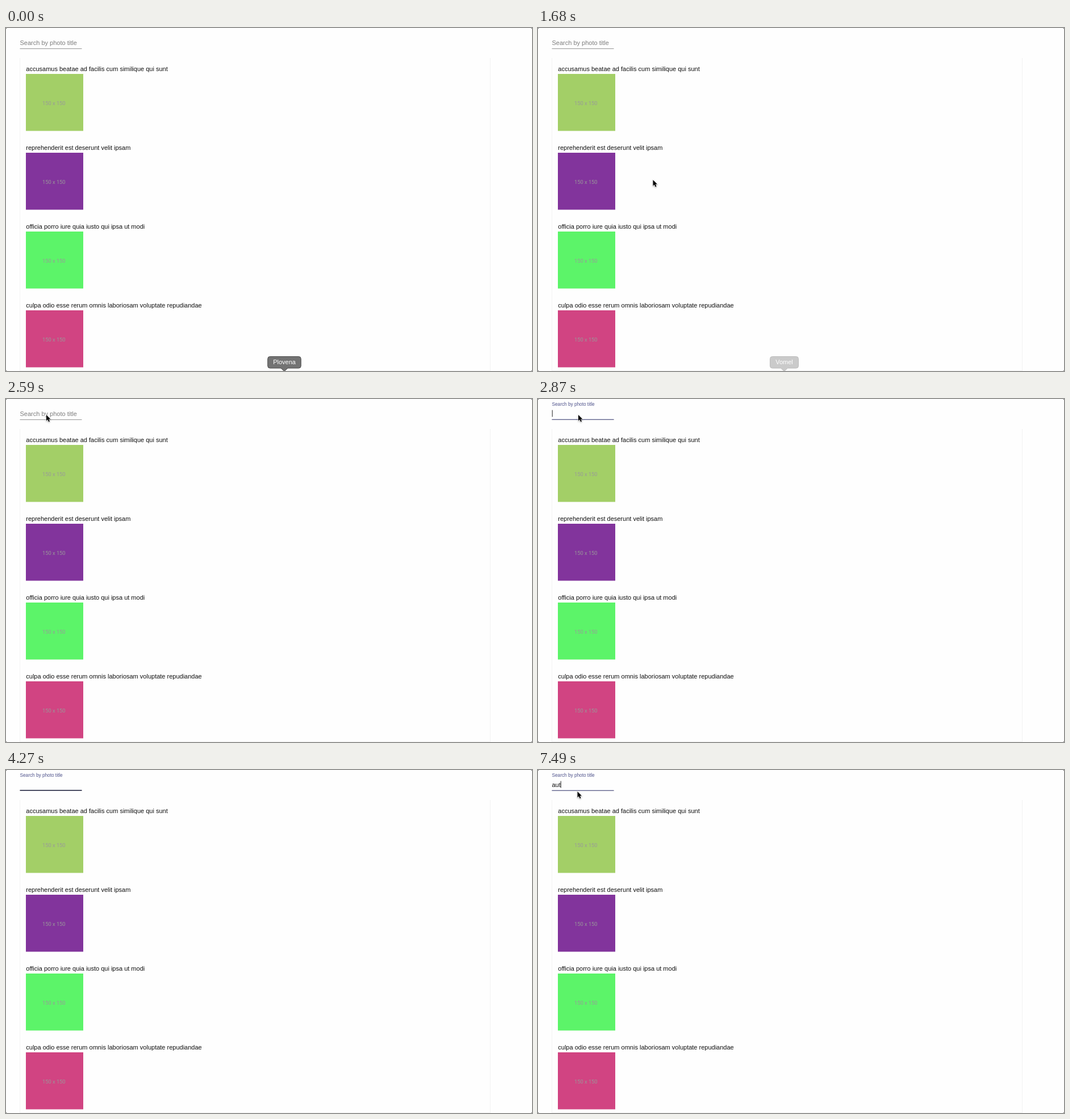
Write an HTML page that moves like this. It is 926x605 px and loops after 8 s.

```html
<!DOCTYPE html>
<html lang="en">
<head>
<meta charset="utf-8">
<title>Photo search</title>
<style>
  html, body { margin: 0; width: 100%; height: 100%; overflow: hidden; background: #555; }
  svg { display: block; width: 926px; height: 605px; }
  text { font-family: "Liberation Sans", Arial, sans-serif; font-size: 11px; fill: #111; }
  .size { font-family: Roboto, sans-serif; font-size: 9.3px; fill: #999; text-anchor: middle; }
  .tip text { fill: #fff; text-anchor: middle; }
  .tip path { fill: #737373; stroke: #4c4c4c; }
</style>
</head>
<body>
<svg viewBox="0 0 926 605">
  <rect width="926" height="605" rx="2.5" fill="#fefefe"/>
  <path d="M24.5 53V605M852.5 53V605M25 604.5H852" stroke="#f3f3f3" fill="none"/>
  <g id="photos"></g>
  <text id="label" x="24.5"></text>
  <rect y="36" x="24.5" width="109" height="1" fill="#949494"/>
  <rect id="focusLine" y="36"/>
  <text id="typed" x="24.5" y="29.5"></text>
  <rect id="caret" y="19.5" width="1" height="12" fill="#222"/>
  <g id="tips"></g>
  <path id="cursor" d="M0 0V10.4L2.4 8.2L4.1 12.2L6 11.4L4.3 7.5H7.5Z"
        stroke="#fff" stroke-width="1.2" paint-order="stroke" style="filter:drop-shadow(0 1px 1px #0005)"/>
</svg>
<script>
const LOOP = 8000, STEP = 70;
const $ = id => document.getElementById(id);
const set = (el, attrs) => { for (const k in attrs) el.setAttribute(k, attrs[k]); };
const progress = (t, from, to) => Math.min(1, Math.max(0, (t - from) / (to - from)));
const lerp = (a, b, p) => a + (b - a) * p;
const mix = (a, b, p) => `rgb(${a.map((v, i) => Math.round(lerp(v, b[i], p)))})`;

const photos = [
  ["accusamus beatae ad facilis cum similique qui sunt", "#a3cf67"],
  ["reprehenderit est deserunt velit ipsam", "#82349c"],
  ["officia porro iure quia iusto qui ipsa ut modi", "#5cf469"],
  ["culpa odio esse rerum omnis laboriosam voluptate repudiandae", "#d14482"]
];
$("photos").innerHTML = photos.map(([title, color], i) => `
  <g transform="translate(35 ${i * 139})">
    <text x="0.3" y="76">${title}</text>
    <rect y="81" width="101" height="100.5" fill="${color}"/>
    <text class="size" x="49.3" y="135.8">150 x 150</text>
  </g>`).join("");

// Dock tooltip centred on x, with its pointer at the bottom edge
const tooltip = (name, x, width) => {
  const h = width / 2;
  return `<g class="tip" transform="translate(${x} 0)">
    <path d="M${4 - h} 579.5H${h - 4}q4 0 4 4V596q0 4 -4 4H6L0 605.5L-6 600H${4 - h}q-4 0 -4 -4V583.5q0 -4 4 -4Z"/>
    <text y="593">${name}</text></g>`;
};
$("tips").innerHTML = tooltip("Plovena", 490, 58.5) + tooltip("Vomel", 433.5, 50);
const [firstTip, secondTip] = $("tips").children;

// Pointer path: time, x, y
const path = [
  [1470, 433, 620], [1540, 375, 525], [1610, 285, 390], [1680, 202.5, 268],
  [1750, 148, 172], [1820, 112, 100], [1890, 92, 50], [1960, 81, 20], [2030, 77.5, 7],
  [2170, 77.5, 7], [2380, 71, 28], [3360, 71, 28], [3500, 84, 18],
  [3640, 84, 18], [3780, 68, 18], [6020, 68, 18], [6230, 67, 31],
  [7350, 67, 31], [7490, 69.5, 38], [LOOP, 69.5, 38]
];
function pointerAt(t) {
  const i = Math.max(1, path.findIndex(p => p[0] >= t));
  const [a, b] = [path[i - 1], path[i]];
  const p = progress(t, a[0], b[0]);
  return [lerp(a[1], b[1], p), lerp(a[2], b[2], p)];
}

$("label").textContent = "Search by photo title";
const GREY = [125, 125, 125], INDIGO = [78, 82, 139], DARK = [58, 61, 88];

function draw(time) {
  const t = Math.floor(time / STEP) * STEP;
  const focus = progress(t, 2660, 2870);
  const typing = t >= 7420;
  const thick = typing ? 0 : progress(t, 3010, 3290);

  set(firstTip, { opacity: t < 1470 ? 1 : 0 });
  set(secondTip, { opacity: t < 1470 ? 0 : 1 - progress(t, 1540, 1760) });

  set($("label"), { y: lerp(29.8, 12.4, focus), fill: "" });
  $("label").style.fontSize = lerp(11, 8.25, focus) + "px";
  $("label").style.fill = mix(GREY, INDIGO, focus);

  const height = lerp(1, 1.6, thick);
  set($("focusLine"), {
    x: 79 - 54.5 * focus, width: 109 * focus,
    y: 36.6 - height, height: height, fill: mix(INDIGO, DARK, thick)
  });

  $("typed").textContent = typing ? "aut" : "";
  const caretOn = (t >= 2800 && t < 3220) || (t >= 3710 && t < 4200) || typing;
  set($("caret"), { x: typing ? 39.7 : 24.7, opacity: caretOn ? 1 : 0 });

  const visible = t >= 1540 && (t < 4270 || t >= 6090);
  set($("cursor"), { transform: `translate(${pointerAt(t)})`, opacity: visible ? 1 : 0 });
}

const start = performance.now();
function tick() {
  draw((performance.now() - start) % LOOP);
  requestAnimationFrame(tick);
}
tick();
</script>
</body>
</html>
```
